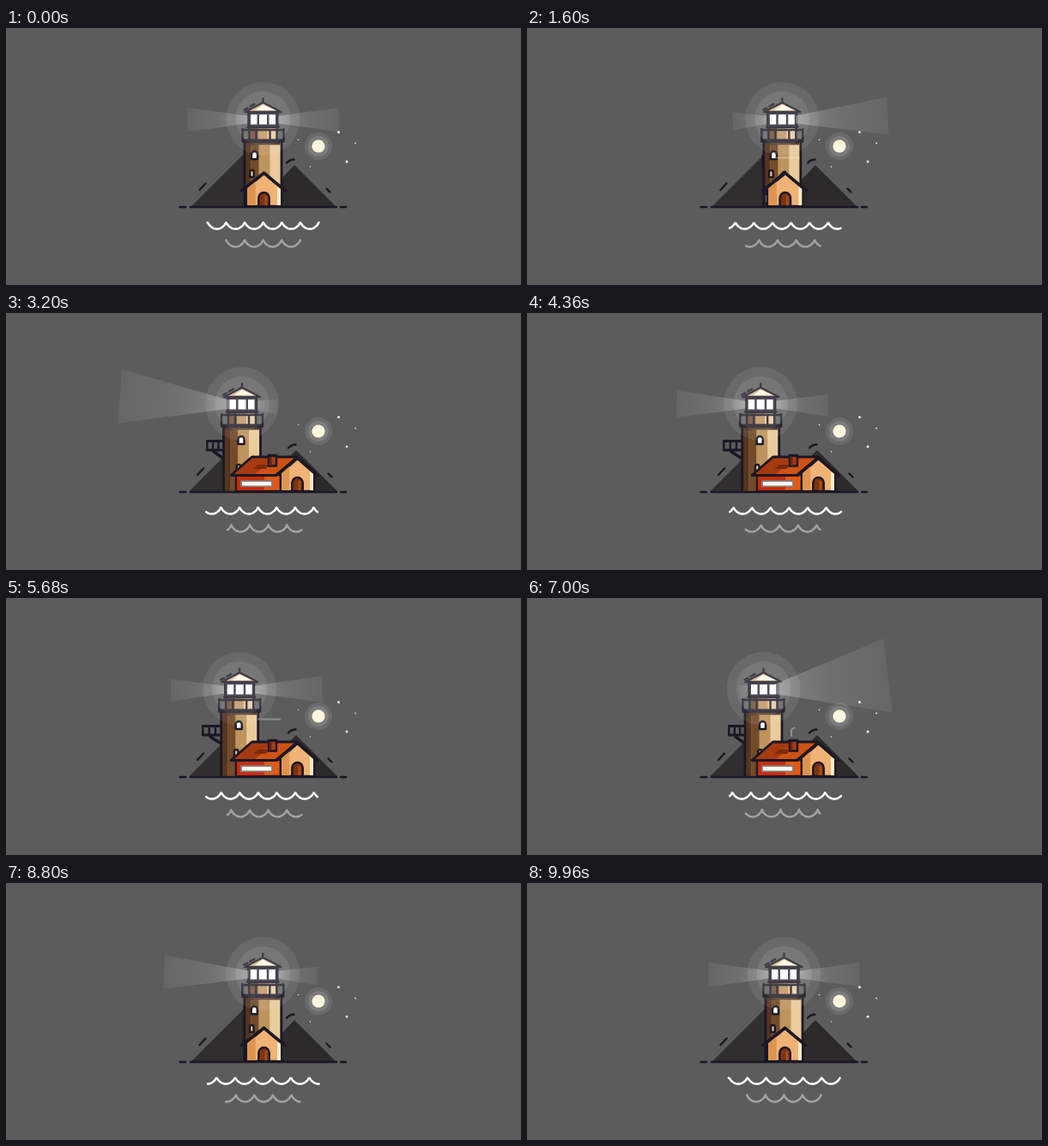
An HTML page that plays this animation: 600x300 px, repeating every 10000 ms.

```html
<!DOCTYPE html>
<html lang="en">
<head>
<meta charset="utf-8">
<title>Lighthouse</title>
<style>
html, body { margin: 0; width: 100%; height: 100%; overflow: hidden; background: #5c5c5c; }
svg { display: block; width: 600px; height: 300px; }
</style>
</head>
<body>
<svg viewBox="0 0 600 300" fill="none" stroke-linecap="round" stroke-linejoin="round"></svg>
<script>
const LOOP = 10000, INK = '#1b1725';
const svg = document.querySelector('svg');

const mix = (a, b, k) => a + (b - a) * k;
const clamp = (v) => Math.max(0, Math.min(1, v));
const n = (v) => v.toFixed(2);

// Monotone curve through [time, value] keys.
function track(keys, t) {
  const last = keys.length - 1;
  if (t <= keys[0][0]) return keys[0][1];
  if (t >= keys[last][0]) return keys[last][1];
  const slope = (i) => (keys[i + 1][1] - keys[i][1]) / (keys[i + 1][0] - keys[i][0]);
  const tangent = (i) => {
    if (i === 0 || i === last) return 0;
    const a = slope(i - 1), b = slope(i);
    return a * b <= 0 ? 0 : 2 * a * b / (a + b);
  };
  let i = 0;
  while (t > keys[i + 1][0]) i++;
  const [t0, v0] = keys[i], [t1, v1] = keys[i + 1];
  const d = t1 - t0, u = (t - t0) / d, w = u * u * (3 - 2 * u);
  return mix(v0, v1, w) + d * u * (1 - u) * ((1 - u) * tangent(i) - u * tangent(i + 1));
}

const TURN = [[0, 0], [680, 6.5], [1600, 27], [2000, 58], [2800, 116.5], [3200, 136], [4100, 167], [5000, 180]];
const TOWER = [[1040, 299.5], [1600, 297.3], [2100, 292], [2700, 281], [3200, 275], [4100, 272.2],
  [6240, 272.2], [7000, 275.5], [7400, 284], [7800, 293], [8400, 298], [9000, 299.5]];
const HOUSE = [[1450, 0], [1700, .02], [2200, .4], [3000, 1], [7000, 1], [7400, .68], [7800, .24], [8500, 0]];

const rect = (x, y, w, h, fill, more = '') =>
  `<rect x="${n(x)}" y="${n(y)}" width="${n(Math.max(0, w))}" height="${n(h)}" fill="${fill}" ${more}/>`;
const line = (d, stroke = INK, w = 2.4, more = '') =>
  `<path d="${d}" stroke="${stroke}" stroke-width="${w}" ${more}/>`;
const shape = (d, fill, more = '') => `<path d="${d}" fill="${fill}" ${more}/>`;
const disc = (x, y, r, o, fill = '#fff') =>
  `<circle cx="${n(x)}" cy="${n(y)}" r="${r}" fill="${fill}" opacity="${n(o)}"/>`;
const edge = `stroke="${INK}" stroke-width="2.4"`;
const arch = (x, y, w, h) =>
  `M${n(x - w / 2)} ${n(y)}v${n(-h + w / 2)}a${n(w / 2)} ${n(w / 2)} 0 0 1 ${n(w)} 0v${n(h - w / 2)}z`;

function sky(t) {
  const stars = [[387.5, 121.5, 1.5], [397, 156, 1.5], [340.5, 130.5, .8], [407, 134.5, .9], [354.5, 162, .8]];
  return disc(364, 138, 16, .09) + disc(364, 138, 12, .12) + disc(364, 138, 7.6, 1, '#fff8e0') +
    stars.map(([x, y, r], i) =>
      disc(x, y, r, .86 + .12 * Math.cos(2 * Math.PI * t / 2500 + i * .5))).join('');
}

function hills(h) {
  const l = -2.5 * h, r = 2 * h;
  return shape(`M${n(216 + l)} 208L${n(278 + l)} 146L${n(340 + l)} 208z`, '#302e2f') +
    shape(`M290 208L${n(336 + r)} 160L${n(384 + r)} 208z`, '#2c2a2b') +
    line(`M${n(225.5 + l)} 189l7 -7.5`) + line(`M${n(327 + r)} 157.5q3.5 -4 8.5 -4`) +
    line(`M${n(373.5 + r)} 187.5l4 4`);
}

function tower(x, h) {
  const out = .8 * (299.5 - x), left = -21 - out;
  let s = `<g transform="translate(${n(x)} 0)">`;
  if (out > .5) {
    s += line(`M${n(left)} 149.5H-20M${n(left)} 160H-20`, INK, 2.8) +
      line(`M${n(left)} 150v10M${n(-21 - out * .66)} 150v10M${n(-21 - out * .33)} 150v10`, INK, 2.4) +
      line(`M${n(-21 - out * .6)} 162L-20 171`, INK, 3.4);
  }
  s += rect(-21, 133, 42, 75, '#bd935e') + rect(-21, 133, 7, 75, '#54351f') +
    rect(-14, 133, 9, 75, '#714b2a') + rect(8, 133, 13, 75, '#e9cb9c') +
    line('M-21.5 133V208M21.5 133V208', INK, 2.8);
  const wx = -10 + 9 * h;
  s += shape(arch(wx, 153, 7, 9), '#fff', edge) +
    shape(arch(-13 + 9 * h, mix(174, 185, h), 4.5, 8), '#e9d3aa', edge);
  // gallery
  s += rect(-16, 116, 32, 15, '#bd935e') + rect(-16, 116, 10, 15, '#6d4a2c') +
    rect(5, 116, 11, 15, '#e9cb9c') + line('M-24 119H24', INK, 2.4) +
    line('M-24 118V131M-16 117V131M-8 120V131M8 120V131M16 117V131M24 118V131', INK, 2.4) +
    rect(-25, 129.5, 50, 4.4, INK, 'rx="1.5"') + rect(-20, 134, 40, 2.4, '#4a3122');
  // lantern
  s += rect(-17, 98, 34, 18, '#2f2a38', edge) + rect(-14.5, 101, 7.5, 11.5, '#fff') +
    rect(-4.5, 101, 9, 11.5, '#fff') + rect(7, 101, 7.5, 11.5, '#fff') +
    line('M-18 115.5H18', INK, 2.6) +
    shape('M-21 98L0 87L21 98z', '#d9b98d', edge) + shape('M-9 96L0 89.5L14 96z', '#fff6e6') +
    line('M0 87V82.5', INK, 2.4) + line('M-22 95.5l4 -2M-15 91.5l5 -2.8', INK, 2.2);
  return s + '</g>';
}

function house(h) {
  const fl = mix(280, 320, h), fr = mix(321, 359, h), top = (fl + fr) / 2;
  const deep = Math.pow(h, .75), sl = fl - 52 * deep;
  let s = '';
  if (deep > .02) {
    s += rect(sl, 189, fl - sl, 19, '#e25a12', edge) + rect(sl + 1, 190, 32 * deep, 17, '#c62d0a') +
      rect(sl + 6 * deep, 196, 36 * deep, 6.4, '#fff', 'stroke="#8b7775" stroke-width="1.8"');
    const ridge = top - 53 * deep, eave = sl - 6 * deep, at = (a, b, k) => n(mix(a, b, k));
    s += shape(`M${n(eave)} 189.5L${n(ridge)} 168H${n(top)}L${n(fl - 5)} 189.5z`, '#cd5214') +
      shape(`M${n(eave)} 189.5L${n(ridge)} 168H${at(ridge, top, .5)}L${at(eave, fl - 5, .5)} 189.5z`, '#a63a0f') +
      shape(`M${at(eave, fl, .45)} 182h${n(14 * deep)}l${n(6 * deep)} -5h${n(-14 * deep)}z`, '#7a2a0e') +
      shape(`M${n(eave)} 189.5L${n(ridge)} 168H${n(top)}L${n(fl - 5)} 189.5z`, 'none', `stroke="${INK}" stroke-width="2.8"`);
  }
  s += shape(`M${n(fl)} 208V187L${n(top)} 170L${n(fr)} 187V208z`, '#f0b275', edge) +
    shape(`M${n(fl + 1)} 207V187L${n(mix(fl, fr, .26))} 179V207z`, '#dd9450') +
    shape(`M${n(fr - 5)} 207V185l4 3V207z`, '#ffe9cb');
  s += shape(arch(top, 208, 12.5, 16), '#7c3410', edge) + rect(top + 1, 196, 3, 11, '#a84c18');
  s += line(`M${n(fl - 5.5)} 189.5L${n(top)} 169L${n(fr + 4)} 189.5`, INK, 3.4);
  const rise = clamp((h - .04) * 8);
  if (rise > 0) {
    const cx = top - 29 * Math.pow(h, .34), y = 178.5 - 12.5 * rise;
    s += rect(cx - 4.5, y, 9, 12.5 * rise, '#a63c12', edge) + rect(cx - 4, y, 3, 12 * rise, '#6a250d') +
      rect(cx - 5.8, y - 1, 11.6, 3, INK);
  }
  return s;
}

function smoke(t, h) {
  let s = '';
  const trail = (d, from, to) => {
    if (t < from || t > to) return;
    const u = (t - from) / (to - from), head = clamp(u * 2), tail = clamp(u * 2 - 1);
    s += line(d, '#fff', 2.2, `pathLength="100" stroke-dasharray="${n(100 * (head - tail))} 200" stroke-dashoffset="${n(-100 * tail)}" opacity=".3"`);
  };
  trail('M286 151.5H317', 1250, 1950);
  trail('M294 141.5H319', 5330, 6030);
  const x = mix(288, 308, Math.pow(h, .6));
  trail(`M${n(x)} 161v-5q0 -4.5 4.5 -4.5h17a4.8 4.8 0 1 0 -4.8 -4.8`, 6800, 8600);
  return s;
}

function beam(id, x, a) {
  const L = 88, D = 110, c = Math.cos(a), z = L * Math.sin(a), k = D / (D - z);
  const y = 107, ex = x + L * c * k, ey = y - 7.8 * (k - 1), r = 14 * k;
  const sx = x + 18 * c, dx = ex - sx, dy = ey - y, len = Math.hypot(dx, dy) || 1;
  const ux = dx / len, uy = dy / len, cap = r * .95 * clamp((k - 3.12) / .4);
  const at = (px, py, w) => `${n(px - uy * w)} ${n(py + ux * w)}`;
  const tilt = n(Math.atan2(uy, ux) * 180 / Math.PI);
  let d = `M${at(sx, y, 4.5)}L${at(ex, ey, r)}`;
  d += cap > .5 ? `A${n(cap)} ${n(r)} ${tilt} 0 0 ${at(ex, ey, -r)}` : `L${at(ex, ey, -r)}`;
  d += `L${at(sx, y, -4.5)}z`;
  let s = `<linearGradient id="${id}" gradientUnits="userSpaceOnUse" x1="${n(sx)}" y1="${y}" x2="${n(ex)}" y2="${n(ey)}">` +
    [[0, .36], [.22, .2], [.5, .115], [1, .065]].map(([o, v]) =>
      `<stop offset="${o}" stop-color="#fff" stop-opacity="${v}"/>`).join('') + '</linearGradient>';
  // Head-on, the cone lies almost inside its own disc.
  if (Math.abs(c) < .3) {
    s += `<ellipse cx="${n(ex)}" cy="${n(ey)}" rx="${n(cap)}" ry="${n(r)}" fill="#fff" opacity=".07"/>`;
    return s + shape(d, `url(#${id})`, `opacity="${n(Math.abs(c) / .3)}"`);
  }
  return s + shape(d, `url(#${id})`);
}

function wave(x, y, arcs, shift, color) {
  const W = 21.6, pts = [];
  for (let i = 0; i <= arcs * 24; i++) {
    const px = x + i * W / 24, u = (((px - shift) / W) % 1 + 1) % 1;
    pts.push(n(px) + ' ' + n(y + 8.6 * Math.pow(Math.sin(Math.PI * u), .6)));
  }
  return line('M' + pts.join('L'), color, 2.5);
}

function sea(t) {
  const p = t / 2500, sway = 1.6 * Math.sin(2 * Math.PI * p);
  return wave(234.8 - sway, 226, 6, 235 - 21.6 * p, '#fff') +
    wave(256.4 + sway, 246.8, 4, 256.5 + 21.6 * p, '#a3a3a3');
}

function draw(t) {
  const x = track(TOWER, t), h = track(HOUSE, t);
  const a = track(TURN, t % 5000) * Math.PI / 180;
  svg.innerHTML = rect(0, 0, 600, 300, '#5c5c5c') + sky(t) + hills(h) +
    beam('far', x, a + Math.PI) + tower(x, h) +
    disc(x, 106, 43, .08) + disc(x, 106, 32, .085) +
    house(h) + line('M202.5 209H209M215 209H385M390 209H396', INK, 2.5) +
    smoke(t, h) + beam('near', x, a) + sea(t);
}

const start = performance.now();
function tick() {
  draw((performance.now() - start) % LOOP);
  requestAnimationFrame(tick);
}
tick();
</script>
</body>
</html>
```
